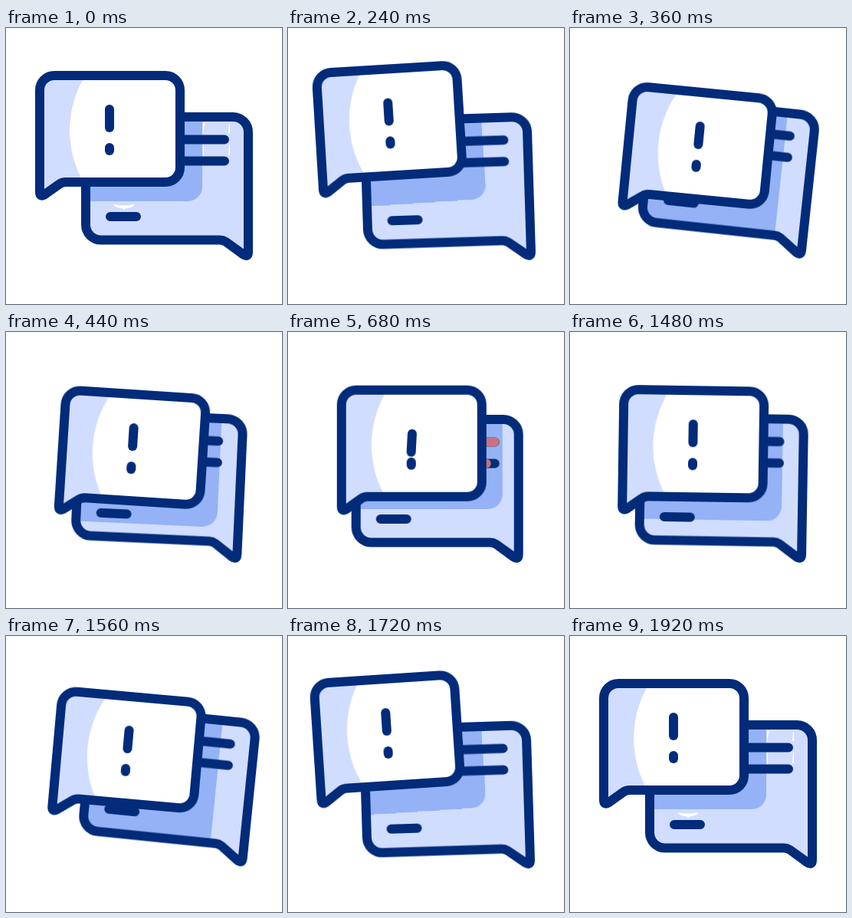
Write an HTML page without scripts that moves like this. It is 360 by 360 pixels and loops after 2 s.

```html
<!DOCTYPE html>
<html lang="en">
<head>
<meta charset="utf-8">
<title>Chat alert</title>
<style>
  html, body { margin: 0; width: 100%; height: 100%; overflow: hidden; background: #fff; }
  svg { display: block; width: 100%; height: 100%; }

  .ink { fill: none; stroke: #022b7a; stroke-width: 12; stroke-linecap: round; stroke-linejoin: round; }
  .pale { fill: #d1ddfe; }
  .shade { fill: #94b2f5; }
  .flash { stroke: #c9727f; }
  .glint { fill: #fff; }

  .move { animation: 2s linear infinite; }
  #front { transform-origin: 135px 118px; animation-name: front; }
  #back { transform-origin: 210px 196px; animation-name: back; }
  #shadow { transform-origin: 210px 196px; animation-name: shadow; }
  #bar { transform-origin: 135px 118px; animation-name: bar; }
  #dot { animation-name: dot; }
  .flash { animation-name: flash; animation-timing-function: step-end; }
  .glint { animation-name: glint; animation-timing-function: step-end; }

  @keyframes front {
    0%, 7% { transform: none; animation-timing-function: ease-in-out; }
    12% { transform: translate(-4px, -8.5px) rotate(-3.5deg); animation-timing-function: ease-in; }
    16% { transform: translate(23px, 13px) rotate(4deg); animation-timing-function: ease-out; }
    18% { transform: translate(33.5px, 22px) rotate(5.6deg); animation-timing-function: ease-in-out; }
    28%, 72.5% { transform: translate(25.8px, 13.7px) rotate(0deg); animation-timing-function: ease-in-out; }
    78% { transform: translate(24.5px, 17px) rotate(5.1deg); animation-timing-function: ease-in-out; }
    84% { transform: translate(-12px, -12.5px) rotate(-5deg); }
    86% { transform: translate(-7px, -6px) rotate(-3.8deg); animation-timing-function: ease-out; }
    95%, 100% { transform: none; }
  }
  @keyframes back {
    0%, 7% { transform: none; animation-timing-function: ease-in-out; }
    12% { transform: translate(-2px, 3px) rotate(-1.8deg); animation-timing-function: ease-in-out; }
    16% { transform: translate(6px, -11px) rotate(7deg); }
    18% { transform: translate(-3px, -13px) rotate(6.2deg); animation-timing-function: ease-out; }
    28%, 72.5% { transform: translate(-15.3px, -2px) rotate(0deg); animation-timing-function: ease-in-out; }
    78% { transform: translate(2.8px, -12.5px) rotate(5.8deg); }
    80% { transform: translate(10px, -11px) rotate(6.5deg); animation-timing-function: ease-in-out; }
    84% { transform: translate(-4px, 3px) rotate(-2.4deg); }
    86% { transform: translate(-3px, 3.5px) rotate(-1.8deg); animation-timing-function: ease-out; }
    95%, 100% { transform: none; }
  }
  @keyframes shadow {
    0%, 7% { transform: none; }
    12% { transform: translate(3px, -4px) rotate(-2deg); }
    16% { transform: translate(16px, 60px); }
    18% { transform: translate(22.5px, 65px); animation-timing-function: ease-out; }
    28%, 72.5% { transform: translate(39px, 7px); }
    78% { transform: translate(16px, 65px); }
    80% { transform: translate(12px, 58px); }
    84% { transform: translate(3px, -5px) rotate(-2.4deg); }
    86% { transform: translate(4px, -3px) rotate(-2deg); }
    95%, 100% { transform: none; }
  }
  @keyframes bar {
    0%, 24% { transform: none; animation-timing-function: ease-in-out; }
    34% { transform: translate(.5px, 13px) rotate(3deg); animation-timing-function: ease-in-out; }
    41% { transform: translate(0, -5px) rotate(-3deg); animation-timing-function: ease-in-out; }
    48% { transform: translate(0, 2px) rotate(1deg); animation-timing-function: ease-in-out; }
    57%, 100% { transform: none; }
  }
  @keyframes dot {
    0%, 34% { transform: none; animation-timing-function: ease-in-out; }
    41% { transform: translateY(-2px); animation-timing-function: ease-in-out; }
    48%, 100% { transform: none; }
  }
  @keyframes flash {
    0% { opacity: 0; }
    34% { opacity: 1; }
    36%, 100% { opacity: 0; }
  }
  @keyframes glint {
    0% { opacity: 1; }
    8% { opacity: 0; }
    96%, 100% { opacity: 1; }
  }
</style>
</head>
<body>
<svg viewBox="0 0 360 360" role="img" aria-label="Two chat bubbles with an exclamation mark">
  <defs>
    <path id="frontShape" d="M44 81A19 19 0 0 1 63 62H208A19 19 0 0 1 227 81V182A19 19 0 0 1 208 201H78Q73 201 69 204L50 217.500Q44 221 44 214Z"/>
    <path id="backShape" d="M104 136A20 20 0 0 1 124 116H296A20 20 0 0 1 316 136V292Q316 300 309 295L287 279Q283 276.500 279 276.500H124A20 20 0 0 1 104 256.500Z"/>
    <clipPath id="frontClip"><use href="#frontShape"/></clipPath>
    <clipPath id="backClip"><use href="#backShape"/></clipPath>
  </defs>

  <g id="back" class="move">
    <use href="#backShape" class="pale"/>
    <g clip-path="url(#backClip)">
      <rect id="shadow" class="move shade" x="-40" y="-60" width="296" height="286" rx="19"/>
      <path class="move glint" d="M257 124h3q-3 8-2 14h-1zM257 152h1v15h-1zM291 125h1v12h-2zM291 152h1v14h-2z"/>
      <path class="move glint" d="M140 230Q154 233 168 230Q165 235 157 235L154 237L151 235Q143 235 140 230Z"/>
    </g>
    <use href="#backShape" class="ink"/>
    <path class="ink" d="M210 145.500H285M210 173.500H285M136 246H170"/>
    <path class="ink move flash" d="M276 145.500H285M272 173.500H274"/>
  </g>

  <g id="front" class="move">
    <use href="#frontShape" fill="#fff"/>
    <path class="pale" clip-path="url(#frontClip)" d="M40 58H106A136 136 0 0 0 101 201V224H40Z"/>
    <use href="#frontShape" class="ink"/>
    <path id="bar" class="ink move" d="M135 106V130"/>
    <path id="dot" class="ink move" d="M135 156V160"/>
  </g>
</svg>
</body>
</html>
```
